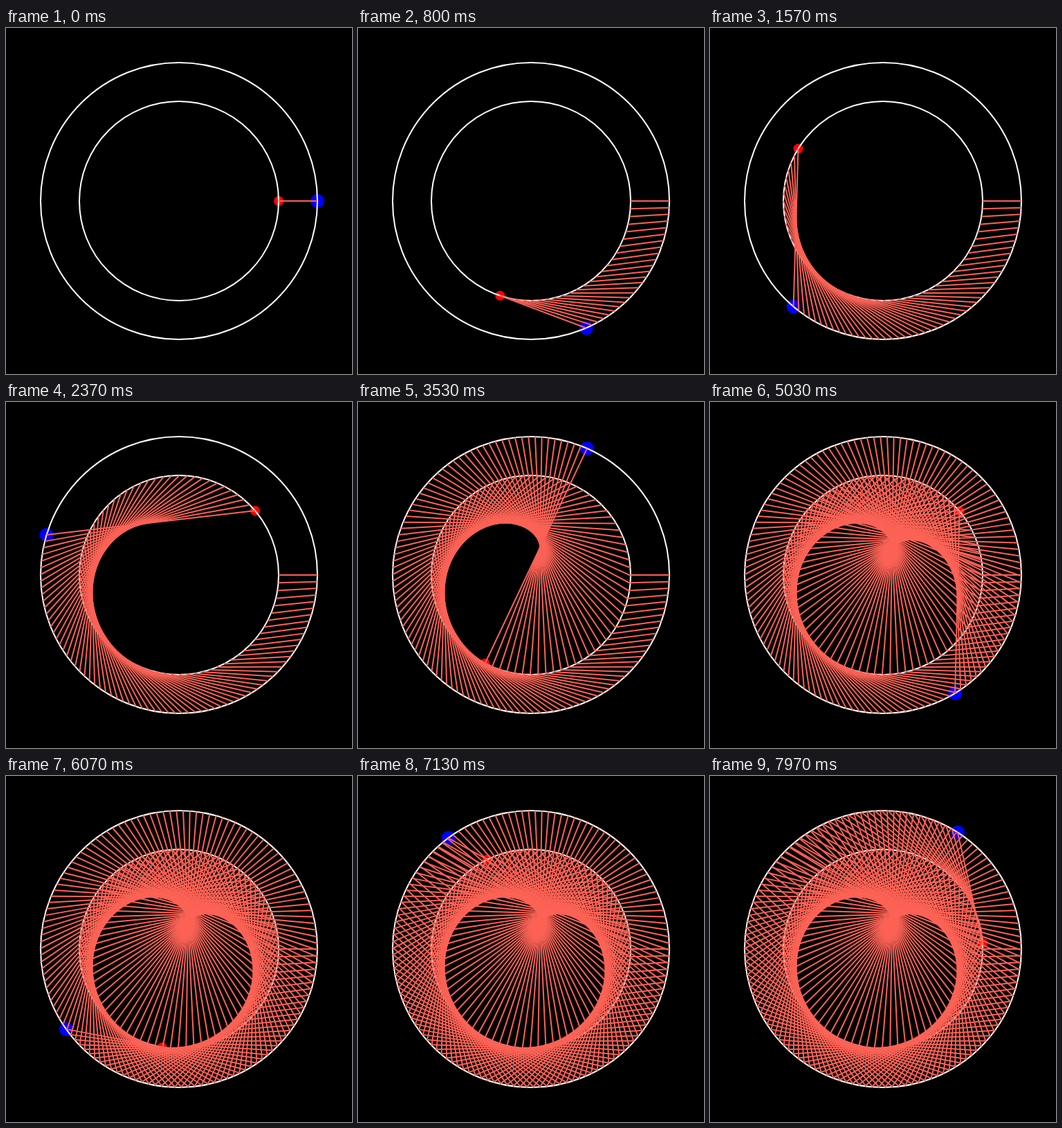
These frames come from a looping animation (500 px wide and 500 px high, 8 s). An HTML page with a canvas:

```html
<!DOCTYPE html>
<html lang="en">
<head>
<meta charset="utf-8">
<title>Two orbits</title>
<style>
  html, body { margin: 0; width: 100%; height: 100%; overflow: hidden; background: #000; }
  canvas { display: block; width: 500px; height: 500px; }
</style>
</head>
<body>
<canvas id="stage" width="500" height="500"></canvas>
<script>
const ctx = document.getElementById('stage').getContext('2d');
const LOOP = 8000;
const CENTER = 250;
const RAD = Math.PI / 180;

// speed: degrees per step, 30 steps per second
const outer = { radius: 200, speed: 2.7725, dot: 10, color: '#00f' };
const inner = { radius: 144, speed: 4.5043, dot: 7, color: '#f00' };
const bodies = [outer, inner];

function position({ radius, speed }, step) {
  const angle = speed * step * RAD;
  return [CENTER + radius * Math.cos(angle), CENTER + radius * Math.sin(angle)];
}

function circle(x, y, radius) {
  ctx.beginPath();
  ctx.arc(x, y, radius, 0, 2 * Math.PI);
}

function draw(step) {
  ctx.fillStyle = '#000';
  ctx.fillRect(0, 0, 500, 500);
  ctx.lineWidth = 2;

  for (const body of bodies) {
    ctx.fillStyle = body.color;
    circle(...position(body, step), body.dot);
    ctx.fill();
  }

  ctx.strokeStyle = '#fff';
  for (const body of bodies) {
    circle(CENTER, CENTER, body.radius);
    ctx.stroke();
  }

  // Separate strokes let the soft edges build up where lines overlap
  ctx.strokeStyle = '#fc6255';
  for (let i = 0; i <= step; i++) {
    ctx.beginPath();
    ctx.moveTo(...position(outer, i));
    ctx.lineTo(...position(inner, i));
    ctx.stroke();
  }
}

// Steps begin on multiples of 10 ms: 0, 30, 70, 100, ...
const stepAt = ms => Math.floor((Math.floor(ms / 10) + 0.5) * 0.3);

let shown = -1;
const start = performance.now();

function tick() {
  const step = stepAt((performance.now() - start) % LOOP);
  if (step !== shown) draw(shown = step);
  requestAnimationFrame(tick);
}
tick();
</script>
</body>
</html>
```
